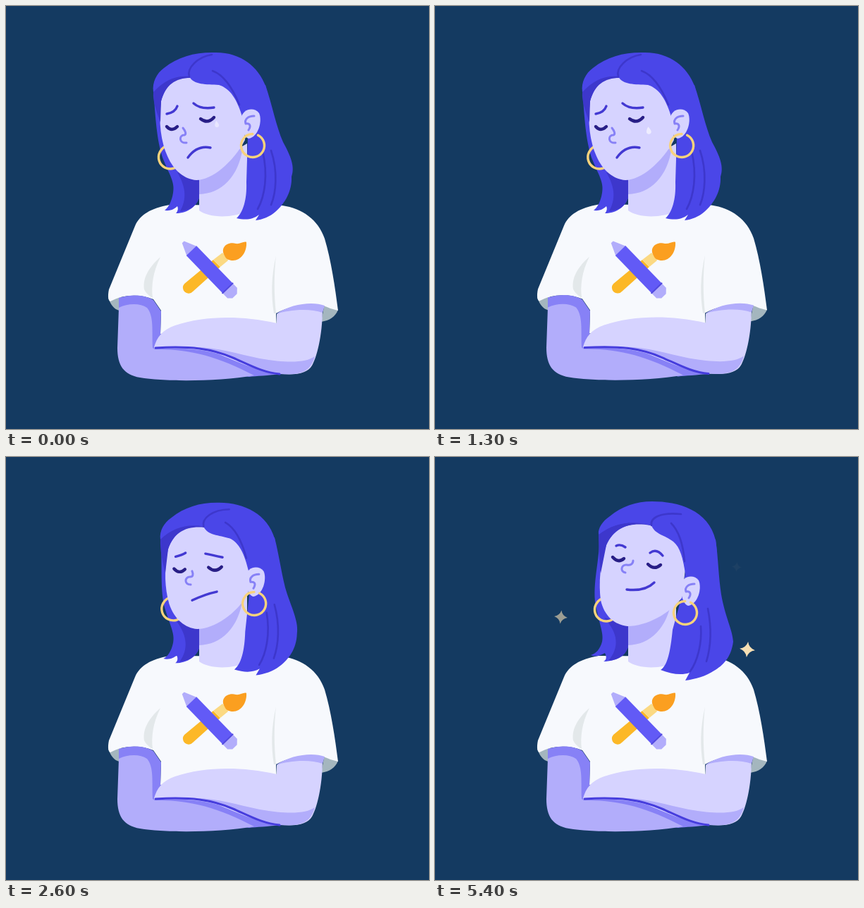
An HTML page with a canvas that plays this animation: 600x600 px, repeating every 5.5 s.

```html
<!DOCTYPE html>
<html>
<head>
<meta charset="utf-8">
<style>
html, body { margin: 0; width: 600px; height: 600px; overflow: hidden; background: #143a61; }
canvas { display: block; }
</style>
</head>
<body>
<canvas id="stage" width="600" height="600"></canvas>
<script>
const ctx = document.getElementById('stage').getContext('2d');
const LOOP = 5500, SOB = 1200, SAD_END = 2400;
const HAIR = '#4a46e8', HAIR_DARK = '#3d37cc', SKIN = '#d6d3ff', SHADE = '#b2adfb',
      DEEP = '#8781f6', SHIRT = '#f7f9fd', FOLD = '#e3e8ea', GOLD = '#f8d37c';
let left = 0, happy = 0;   // weights of the two poses against the sad one

const smooth = (a, b, t) => {
  const k = Math.min(1, Math.max(0, (t - a) / (b - a)));
  return k * k * (3 - 2 * k);
};
const fill = (d, color) => { ctx.fillStyle = color; ctx.fill(new Path2D(d)); };
const line = (d, color, width) => {
  ctx.strokeStyle = color;
  ctx.lineWidth = width;
  ctx.stroke(new Path2D(d));
};
const at = (x, y, angle, scale, draw) => {
  ctx.save();
  ctx.translate(x, y);
  ctx.rotate(angle * Math.PI / 180);
  ctx.scale(scale, scale);
  draw();
  ctx.restore();
};

// Blends a sad path with its turned and happy versions; a pair [dx, dy] means a shifted copy.
function pose(sad, turned, glad) {
  const numbers = p => typeof p === 'string' ? p.match(/[\d.]+/g) : null;
  const a = numbers(turned), b = numbers(glad);
  let i = 0;
  return sad.replace(/[\d.]+/g, s => {
    const v = +s, dl = a ? a[i] - v : turned[i % 2], dh = b ? b[i] - v : glad[i % 2];
    i++;
    return v + left * dl + happy * dh;
  });
}

function body() {
  fill('M145,414L148,421C152,428 156,431 161,432L164,408Z', '#a4b6be');
  fill('M452,422L471,431C467,441 459,446 447,448Z', '#a4b6be');
  fill('M232,282C205,287 190,296 183,312L146,402C144,412 145,418 148,419C165,409 190,408 209,416L220,432L219,465L384,454L383,436C405,424 440,418 460,429L471,432C467,400 461,360 452,330C443,303 420,287 392,283Z', SHIRT);
  fill('M219,356C200,373 194,388 196,402C199,408 204,412 208,414C206,398 208,378 219,356Z', FOLD);
  fill('M383,354C376,385 376,410 380,436L383,436C380,410 380,380 383,354Z', FOLD);
  fill('M160,414C180,408 198,410 209,417L220,433L219,465L392,522C370,524 355,525 345,526L200,500L160,430Z', DEEP);
  fill('M160,428C172,422 190,421 200,428C210,440 207,460 208,485L211,487C260,486 300,497 352,524C300,533 225,533 190,527C167,523 158,510 158,485Z', SHADE);
  fill('M210,484C214,470 222,459 240,453C280,440 330,438 384,450L384,437C400,427 425,425 449,428C449,470 440,500 434,510C428,520 415,524 390,522C350,516 330,505 300,493C270,485 240,485 210,486Z', SKIN);
  fill('M383,437C405,422 435,419 452,425L449,435C430,428 400,431 383,437Z', SHADE);
  fill('M438,497C425,506 400,507 360,500C330,494 300,484 270,484C310,490 340,515 390,522C420,524 432,518 438,497Z', SHADE);
  line('M212,485C262,482 292,486 322,499C347,510 365,520 388,522', '#463ddd', 3);
}

function emblem() {
  fill('M253,394L294,360L304,370L265,405A8,8 0 0 1 253,394Z', '#fcb827');
  fill('M294,360L307,350Q313,356 315,361L304,370Z', '#fbd983');
  fill('M310,354C303,342 315,334 326,337C332,338 338,333 341,335C342,349 333,361 322,361C316,361 312,359 310,354Z', '#fb9f20');
  at(288, 373, 46, 1, () => {
    fill('M-53,-2L-35,-10V10L-53,2Z', SHADE);
    fill('M-36,-10H39V10H-36Z', '#625af6');
    fill('M39,-10H47L53,-4V5L48,10H39Z', SHADE);
    line('M38,-10V10', '#5149df', 2);
  });
}

function earring(x, y) {
  ctx.strokeStyle = GOLD;
  ctx.lineWidth = 3.4;
  ctx.beginPath();
  ctx.arc(x, y, 16.5, -1.1, 4.7);
  ctx.stroke();
}

function head(swing) {
  fill(pose('M209,118C212,160 214,190 222,215C232,240 240,250 237,265C235,278 230,286 225,290C235,291 240,287 243,284C245,288 243,292 241,294C258,294 272,284 275,268L274,235L300,150L240,95Z',
    'M201,122C200,150 212,190 216,212C226,240 232,250 228,262C225,275 220,281 213,283C224,285 232,280 236,275C239,284 240,290 237,294C257,294 272,283 275,268L274,235L300,150L240,95Z',
    'M232,105C236,140 224,170 227,205C232,235 240,250 237,262C234,273 228,279 221,281C229,284 236,281 241,278C244,284 243,288 239,290C258,290 272,280 275,266L274,235L300,150L270,85Z'), HAIR);
  fill(pose('M243,236C256,258 256,275 247,291C262,290 273,282 275,267L274,240Z', [-4, 0],
    'M240,228C260,250 262,270 246,289C262,288 272,280 275,266L274,235Z'), HAIR_DARK);
  earring(233 - 14 * left + 10 * happy + swing * 5, 214.5 + 7 * left + 2 * happy);

  fill('M274,235V290C288,301 322,301 342,291L342,195Z', SKIN);
  fill('M274,238V267C305,266 330,243 336,200Z', SHADE);
  fill(pose('M368,112C378,142 383,170 393,193C404,213 410,228 405,242C406,262 396,280 382,292C374,299 364,303 354,304L359,296C350,303 340,304 327,301C336,293 342,275 341,250L343,185L336,158L330,120Z', [0, 0],
    'M398,117C402,145 402,170 406,195C411,225 422,245 423,262C420,285 408,296 396,303C384,311 370,315 355,317L361,306C350,310 335,308 320,302C330,296 334,275 337,245L348,205L355,165L345,110Z'), HAIR);
  fill(pose('M220,135C216,165 220,193 229,213C238,234 254,246 270,247C292,247 322,222 339,190L336,150L320,108L262,98C240,100 226,112 220,135Z',
    'M214,140C212,170 215,195 224,213C234,236 248,248 264,248C288,246 318,220 335,188L332,145L312,108L250,102C232,104 218,118 214,140Z',
    'M243,125C234,150 232,180 235,203C240,226 255,238 273,240C300,240 333,222 350,200L355,160L345,115L307,95C275,92 254,100 243,125Z'), SKIN);
  fill(pose('M209,122C224,104 240,97 262,98L262,102C240,102 226,112 220,135L219,165C213,148 208,135 209,122Z',
    'M200,127C214,109 230,101 250,102L250,105C232,106 218,120 214,140L214,170C207,150 200,140 200,127Z',
    'M232,110C255,92 280,90 307,95L305,97C275,92 254,100 243,125L235,165C234,150 232,130 232,110Z'), HAIR_DARK);
  fill(pose('M209,122C207,108 214,95 224,88C245,71 270,65 298,66C334,66 358,87 368,113L372,130L336,160C328,132 318,117 302,112C284,111 266,112 260,100C240,98 224,106 209,122Z',
    'M200,127C199,112 206,98 218,90C240,73 268,66 295,66C332,66 357,88 367,115L372,130L330,155C322,130 312,118 298,114C282,113 258,115 249,103C230,102 214,110 200,127Z',
    'M232,110C231,100 238,91 248,84C265,70 285,63 308,63C345,63 388,75 398,118L400,135L355,165C352,145 348,128 338,120C325,110 312,110 307,97C280,90 255,92 232,110Z'), HAIR);

  const strand = (...p) => line(pose(...p), HAIR_DARK, 2.6);
  strand('M260,100C256,88 272,72 292,69', 'M249,103C248,90 262,75 281,72', 'M307,97C305,86 320,78 349,81');
  strand('M293,92C310,98 322,118 331,140', [-7, 2], 'M335,94C346,105 352,125 354,148');
  strand('M364,206C372,240 367,270 357,288', [0, 0], 'M377,240C379,265 372,290 362,304');
  strand('M376,205C386,235 383,265 376,282', [0, 0], 'M387,215C393,245 391,270 385,290');

  fill(pose('M333,160C336,145 352,143 359,152C364,163 358,186 344,188C338,186 336,178 334,170Z', [-4, -4], [15, 23]), SKIN);
  line(pose('M352,156C343,156 338,161 340,167C346,166 348,170 344,176', [-4, -4], [16, 24]), DEEP, 3);
  earring(350 - 7 * left + 5 * happy + swing * 2, 198 - 6 * left + 23 * happy);

  const brow = (...p) => line(pose(...p), '#4339d2', 3.4);
  brow('M228,153Q240,151 243,142', 'M222,163Q234,162 238,152', 'M257,126Q263,123 270,128');
  brow('M266,138Q276,147 295,144', 'M261,147Q270,156 289,149', 'M305,136Q314,129 323,140');
  brow('M258,215Q271,197 290,201', 'M259,221Q270,201 288,203', 'M272,188Q298,191 311,178');
  const eye = (...p) => line(pose(...p), '#281e86', 4.4);
  eye('M228,171Q235,179 243,171', 'M224,177Q231,183 239,174', 'M252,142Q260,151 268,144');
  eye('M276,160Q286,168 295,158', 'M272,163Q283,167 290,157', 'M302,152Q311,161 320,153');
  line(pose('M251,173C255,178 256,182 253,183C245,183 245,195 256,194', 'M249,176C252,181 253,186 250,187C242,187 242,199 251,199',
    'M281,147C281,152 277,154 272,153C264,152 262,163 270,164'), DEEP, 3);
}

function drop(x, y, angle, scale, alpha) {
  ctx.globalAlpha = alpha;
  at(x, y, angle, scale, () => fill('M0,-9C4,-3 6,1 4.5,4A5,5 0 0 1 -4.5,4C-6,0 -3,-5 0,-9Z', '#f4f4ff'));
  ctx.globalAlpha = 1;
}

function tears(p) {
  const k = p / 500, far = (p - 500) / 500;
  if (p <= 600) drop(299 + 21 * k, 168 + 46 * k, -8, Math.min(1, 0.6 + 0.4 * k), Math.min(0.9, 0.6 + k));
  if (p >= 400 && p <= 1100) drop(203 - 25 * far, 174 + 28 * far * Math.abs(far), 62 - 8 * far, 0.95, p > 1000 ? 0.5 : 1);
  if (p >= 400 && p <= 800) drop(197 - 20 * far, 216 + 30 * far, 30, 0.85, p > 600 ? 1 - (p - 600) / 250 : 0.95);
}

function sparkle(x, y, radius, level) {
  ctx.globalAlpha = Math.min(1, level);
  at(x, y, 6, radius * (0.55 + 0.45 * level), () =>
    fill('M0,-1Q.16,-.22 1,0Q.2,.2 0,1Q-.2,.2 -1,0Q-.2,-.2 0,-1Z', '#f6dfb4'));
  ctx.globalAlpha = 1;
}

function sparkles(t) {
  const wave = Math.cos((t - 4200) / 400 * Math.PI), show = smooth(3500, 3900, t);
  sparkle(428, 156, 12.5, (0.52 + 0.48 * wave) * show);
  sparkle(178.5, 227, 11.5, (0.8 + 0.2 * wave) * show);
  sparkle(443, 273, 11, (0.87 - 0.13 * wave) * show);
}

function render(t) {
  const sad = t < SAD_END, p = t % SOB;
  const sob = sad ? (1 - Math.cos(2 * Math.PI * p / SOB)) / 2 : 0;
  left = sad ? smooth(600, 900, p) * (1 - smooth(1000, 1200, p)) : 0;
  happy = smooth(2350, 2900, t);

  ctx.fillStyle = '#143a61';
  ctx.fillRect(0, 0, 600, 600);
  ctx.lineCap = ctx.lineJoin = 'round';
  at(0, -6.5 * sob, 0, 1, body);
  at(0, -sob, 0, 1, emblem);
  head(sob);
  if (sad) tears(p);
  if (t > 3600) sparkles(t);
}

function tick(now) {
  render(Math.floor(now % LOOP / 100) * 100);
  requestAnimationFrame(tick);
}
render(0);
requestAnimationFrame(tick);
</script>
</body>
</html>
```
